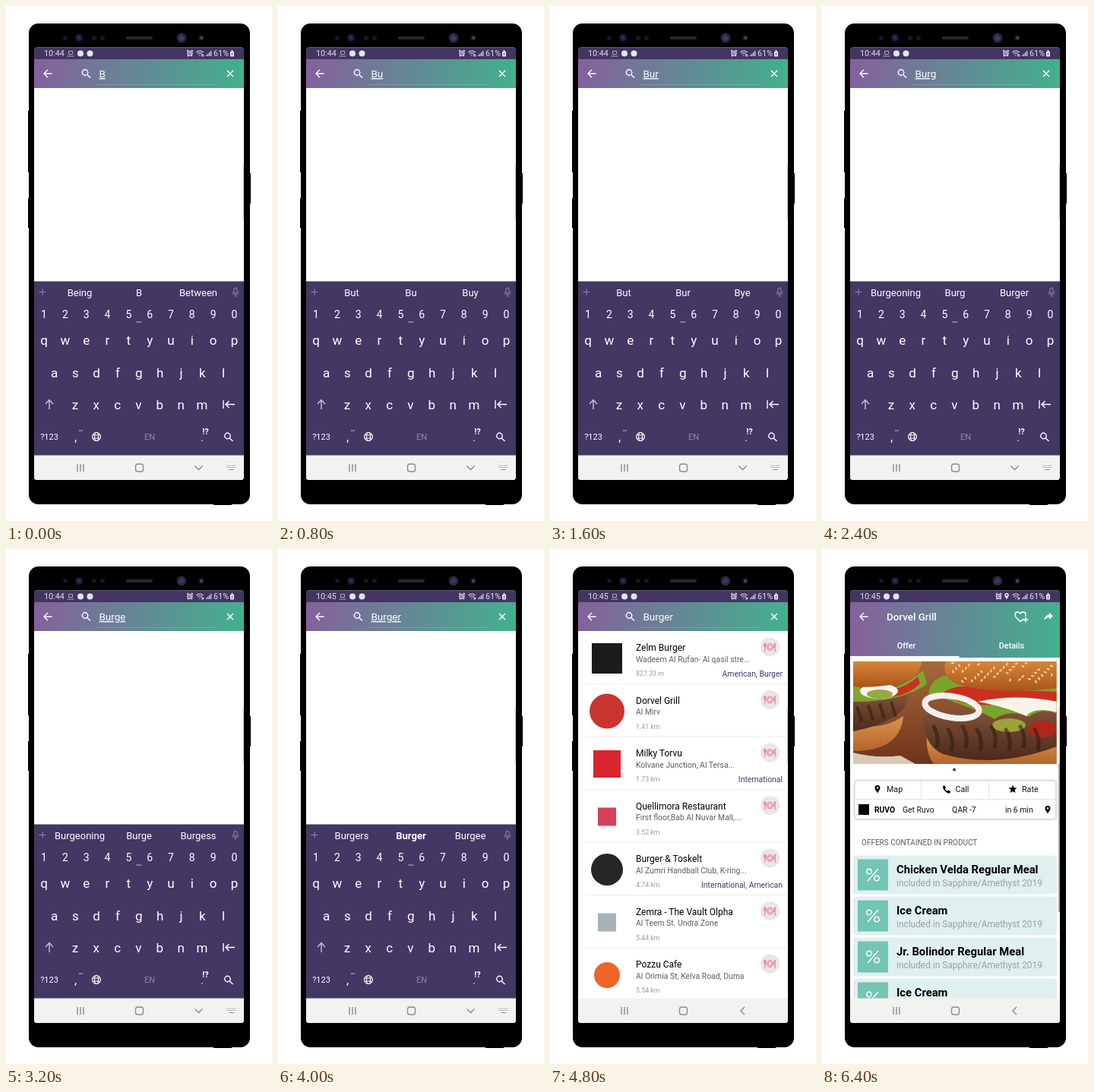
An HTML page for the animation above (8 s loop, 350 by 678 pixels).

```html
<!DOCTYPE html>
<html lang="en">
<head>
<meta charset="utf-8">
<title>Food search on a phone</title>
<style>
  html, body { margin: 0; width: 100%; height: 100%; overflow: hidden; background: #fff; }
  svg { display: block; width: 350px; height: 678px; font-family: Roboto, "Open Sans", Arial, sans-serif; }
  .line { fill: none; stroke: currentColor; stroke-width: 1.4; }
  .mid { text-anchor: middle; }
  .end { text-anchor: end; }
  .typed { text-decoration: underline; text-decoration-thickness: 1px; text-decoration-skip-ink: none; }
  /* --at: start of the visible span, in steps of 800 ms */
  .shown { animation: 8s step-end calc(var(--at) * .8s - 8s) infinite; }
  .key { animation-name: one; }
  .page { animation-name: two; }
  .half { animation-name: five; }
  .search { animation-name: six; }
  .browse { animation-name: eight; }
  @keyframes one { 0% { visibility: visible } 10%, 100% { visibility: hidden } }
  @keyframes two { 0% { visibility: visible } 20%, 100% { visibility: hidden } }
  @keyframes five { 0% { visibility: visible } 50%, 100% { visibility: hidden } }
  @keyframes six { 0% { visibility: visible } 60%, 100% { visibility: hidden } }
  @keyframes eight { 0% { visibility: visible } 80%, 100% { visibility: hidden } }
</style>
</head>
<body>
<svg viewBox="0 0 350 678">
  <defs>
    <linearGradient id="bar"><stop stop-color="#85609d"/><stop offset="1" stop-color="#42b18c"/></linearGradient>
    <linearGradient id="wood" x2="0" y2="1"><stop stop-color="#a8693c"/><stop offset="1" stop-color="#6e331c"/></linearGradient>
    <linearGradient id="bun" x2="0" y2="1"><stop stop-color="#d68539"/><stop offset="1" stop-color="#a9551b"/></linearGradient>
    <linearGradient id="crumb" x2="0" y2="1"><stop stop-color="#d9954f"/><stop offset="1" stop-color="#b5642a"/></linearGradient>
    <linearGradient id="patty" x2="0" y2="1"><stop stop-color="#835339"/><stop offset="1" stop-color="#4b2a1b"/></linearGradient>
    <clipPath id="screen"><rect x="37" y="54.500" width="276" height="569.500" rx="4"/></clipPath>
    <clipPath id="photo"><rect x="41" y="148" width="267.5" height="135"/></clipPath>
    <g id="back" class="line"><path d="M60.500 89H50.500M55 84l-5 5 5 5"/></g>
    <g id="lens" class="line"><circle r="3.700" cx="-1.500" cy="-1.500"/><path d="M1.200 1.200 5.500 5.500"/></g>
    <path id="pin" d="M0 5.500C-1.500 2.500-3.500 1-3.500-1.500a3.500 3.500 0 0 1 7 0C3.500 1 1.500 2.500 0 5.500zM0-3a1.300 1.300 0 1 0 .01 0z" fill-rule="evenodd"/>
    <g id="alarm" class="line"><circle r="2.900" cy=".5"/><path d="M0-1V.8H1.500M-4-2.500-2-4M4-2.500 2-4M-2 3-3 4.200M2 3 3 4.200"/></g>
    <g id="wifi" class="line"><path d="M-4.500-1.500Q0-5.500 4.500-1.500M-2.800.5Q0-2 2.800.5M-.8 2.500H.8M3 1V4M4.500 4V1" stroke-width="1.100"/></g>
    <path id="signal" d="M-4 3.500h1.200V2H-4zM-2 3.500h1.200V.5H-2zM0 3.500h1.200V-1.500H0zM2 3.500h1.200v-7H2z"/>
    <g id="plate">
      <circle r="12.500" fill="#e7e7e8"/>
      <g fill="none" stroke="#f0687c" stroke-width=".9">
        <circle r="4.400"/><circle r="2.700"/>
        <path d="M-7.800-5v3.500q0 1.500 1.100 1.500T-5.600-1.500V-5M-6.700-5V6M6.700 6V-5Q5-3 5.300.800H6.700"/>
      </g>
    </g>
    <g id="percent" fill="none" stroke="#fff" stroke-width="1.400">
      <path d="M7-8-7 8"/><circle cx="-5" cy="-4.500" r="3.200"/><circle cx="5" cy="4.500" r="3.200"/>
    </g>
  </defs>

  <!-- body -->
  <path d="M29 138h2v81h-2zM29 253h2v39h-2zM320 220h2v40h-2zM273 655h24v2h-24z"/>
  <rect x="30" y="23" width="291" height="633" rx="12.500"/>
  <rect x="158" y="40" width="35" height="4" rx="2" fill="#29282b"/>
  <g fill="#17161f">
    <circle cx="78" cy="42" r="3"/><circle cx="116" cy="42" r="3"/><circle cx="127" cy="42" r="3"/>
    <circle cx="96" cy="42" r="5" fill="#1b1a3c"/><circle cx="96" cy="42" r="2.300" fill="#2d2f66"/>
    <circle cx="231" cy="42" r="6.300" fill="#2a2b3c"/><circle cx="231" cy="42" r="3.200" fill="#343f72"/>
    <circle cx="257" cy="42" r="3.500" fill="#1d2030"/><circle cx="257" cy="42" r="1.500" fill="#525d7c"/>
  </g>

  <g clip-path="url(#screen)">
    <rect x="37" y="54" width="277" height="570" fill="#fff"/>
    <rect x="37" y="54" width="277" height="16" fill="#433563"/>
    <rect x="37" y="70" width="277" height="38" fill="url(#bar)"/>

    <!-- search field -->
    <g class="shown browse" style="--at:0" color="#fff">
      <use href="#back"/><use href="#lens" x="105.500" y="89"/>
      <path class="line" d="M291 85l8 8M299 85l-8 8"/>
      <path d="M118 103.500H277" stroke="#fff" stroke-opacity=".16"/>
    </g>

    <g id="keyboard" class="shown search" style="--at:0">
      <rect x="37" y="362.500" width="277" height="230" fill="#433764"/>
      <g color="#928aa9" fill="none" stroke="currentColor">
        <path d="M43.500 376.500h9M48 372v9"/>
        <rect x="300" y="371" width="4" height="7" rx="2"/><path d="M298 376q0 4 4 4t4-4M302 380v3"/>
      </g>
      <g color="#fff" class="line">
        <path d="M57 531v-12M52 524l5-5.500 5 5.500" stroke="#c9c4d5"/>
        <path d="M286 519v11M301 524.500H289M293.500 520l-4.500 4.500 4.500 4.500"/>
        <path d="M171.500 416h7M96 559h5" stroke-width="1.100" stroke-dasharray="1.300 .7"/>
        <g stroke-width="1.100"><circle cx="119" cy="567" r="5.500"/><ellipse cx="119" cy="567" rx="2.500" ry="5.500"/><path d="M114 565h10M114 569h10"/></g>
        <use href="#lens" x="293" y="567.500"/>
      </g>
    </g>

    <g id="list" class="shown page" style="--at:6"></g>

    <g id="offer" class="shown page" style="--at:8">
      <rect x="37" y="70" width="277" height="73" fill="url(#bar)"/>
      <rect x="37" y="141" width="143.500" height="2.500" fill="#fff"/>
      <g color="#fff" fill="#fff">
        <use href="#back"/>
        <path class="line" d="M265 92l-4 3.500q-7-5.500-7-9 0-3.500 3.500-3.500 2 0 3.500 2 1.500-2 3.500-2 3.500 0 3.500 3.500l-.500 2M268 89.500v7M264.500 93h7"/>
        <path d="M292 94q1-7 7-7.500V83.500l5 4.800-5 4.800V90q-4 0-7 4z"/>
      </g>
      <g id="meal" clip-path="url(#photo)">
        <rect x="41" y="148" width="268" height="135" fill="url(#wood)"/>
        <path d="M41 268q30 8 62 4l20 11H41z" fill="#d8c9b8"/>
        <path d="M41 228q34 14 66-8-4 46-66 46z" fill="url(#crumb)"/>
        <path d="M41 198q42-12 72-8 2 35-72 50z" fill="url(#patty)"/>
        <path d="M41 178q40 24 92-18l5 18q-35 24-97 23z" fill="#7fa52f"/>
        <path d="M72 184q30 6 54-16l3 9q-22 22-57 17z" fill="#c9301f"/>
        <ellipse cx="75" cy="187" rx="25" ry="10" fill="#f7f2ee"/>
        <ellipse cx="76" cy="191" rx="17" ry="6" fill="#98a73e"/>
        <path d="M41 148h90q-2 26-42 31-28 4-48 2z" fill="url(#bun)"/>
        <path d="M138 246q75 50 171 5v32H147q-11-15-9-37z" fill="url(#crumb)"/>
        <path d="M133 216q70-12 176-4v48q-80 30-150 10-27-12-26-54z" fill="url(#patty)"/>
        <path d="M140 190q4-24 32-24l137 10v41q-20-9-37 4-25-11-45 3-22-13-87-34z" fill="#79a52d"/>
        <path d="M158 190q20-15 54-6l97 4v12q-40 8-76 3-40 9-75-13z" fill="#cd2f1e"/>
        <path d="M205 201q50-11 104 0v14q-30-8-40 5-30-13-64-19z" fill="#f8f3e9"/>
        <ellipse cx="171" cy="208" rx="36" ry="14" fill="none" stroke="#f6f1ef" stroke-width="8" transform="rotate(9 171 208)"/>
        <ellipse cx="246" cy="232" rx="22" ry="9" fill="#9ca33a"/>
        <ellipse cx="290" cy="237" rx="18" ry="11" fill="#b1251b"/>
        <path d="M163 148h146v35q-75 10-128-4-25-8-18-31z" fill="url(#bun)"/>
      </g>
      <circle cx="174" cy="290.500" r="2" fill="#3e3575"/>
      <rect x="42.500" y="304.500" width="265.500" height="51.500" rx="4" fill="#fff" stroke="#dcdce1" stroke-width="2"/>
      <path d="M43 329.500h265M130.500 305v24M219.500 305v24" stroke="#e2e2e6"/>
      <use href="#pin" x="73" y="316"/><use href="#pin" x="297" y="343"/>
      <path d="M159 312l2.500-.500 1.500 3-1.300 1.300q1.200 2.200 3 3l1.300-1.300 3 1.500-.800 2.500q-2 1-5.500-2-3.800-3.500-3.700-7.500z"/>
      <path d="M251 310.500l1.500 3.700 4 .300-3 2.600.900 3.900-3.400-2.100-3.400 2.100.900-3.900-3-2.600 4-.300z"/>
      <rect x="48" y="336" width="14" height="14"/>
      <rect x="311" y="282" width="2.500" height="196" fill="#a9a9ad"/>
    </g>

    <!-- status bar -->
    <g id="status" fill="#e4e0ec" color="#e4e0ec">
      <g class="shown browse" style="--at:0">
        <path d="M82.500 59.500h5v4h-5zM80.500 66h9" fill="none" stroke="#bdb6cc" stroke-width=".9"/>
        <circle cx="98" cy="62.500" r="4"/><circle cx="110.500" cy="62.500" r="4"/>
        <use href="#alarm" x="242" y="62"/>
      </g>
      <g class="shown page" style="--at:8">
        <circle cx="85" cy="62.500" r="4"/><circle cx="97.500" cy="62.500" r="4"/>
        <use href="#alarm" x="232.500" y="62"/><use href="#pin" transform="translate(243 62)scale(.8)"/>
      </g>
      <use href="#wifi" x="255" y="62.500"/><use href="#signal" x="267" y="62.500"/>
      <path d="M295 60h1.500v-2h2v2h1.500v6.500h-5z"/><path d="M297.500 62v2.500" stroke="#433563"/>
    </g>

    <!-- navigation -->
    <rect x="37" y="591.500" width="277" height="33" fill="#f2f2f0"/>
    <g class="line" color="#8b8b8d">
      <path d="M94 603v10M98 603v10M102 603v10"/>
      <rect x="170.500" y="603" width="10" height="10" rx="3"/>
      <g class="shown search" style="--at:0">
        <path d="M248.500 605.500l5 5 5-5"/>
        <path d="M290.500 605h12M290.500 607.500h12" stroke-width="1.100" stroke-dasharray="1.200 1"/><path d="M293 610.500h7" stroke-width=".9"/>
      </g>
      <path class="shown page" style="--at:6" d="M256 603l-5 5 5 5"/>
      <path class="shown page" style="--at:8" d="M256 603l-5 5 5 5"/>
    </g>
    <rect x="311.500" y="208" width="3" height="74" rx="1.500" fill="#d5d5d8"/>
  </g>
</svg>
<script>
const add = (id, markup) => document.getElementById(id).insertAdjacentHTML('beforeend', markup);
const text = (x, y, size, fill, str, extra = '') =>
  `<text x="${x}" y="${y}" font-size="${size}" fill="${fill}" ${extra}>${str}</text>`;
const mid = 'class="mid" ', end = 'class="end" ';
const bold = 'font-weight="700"', medium = 'font-weight="500"';
const shown = (kind, at, body) => `<g class="shown ${kind}" style="--at:${at}">${body}</g>`;

// Status text
add('status', shown('half', 0, text(50, 66, 10.8, '#e4e0ec', '10:44'))
  + shown('half', 5, text(50, 66, 10.8, '#e4e0ec', '10:45'))
  + text(273, 66, 10.8, '#e4e0ec', '61%'));

// Keyboard
const step = 27.83;
const keyRow = (keys, x, y, size) => [...keys].map((k, i) =>
  text(x + i * step, y, size, '#fff', k, mid)).join('');
add('keyboard', keyRow('1234567890', 50, 411, 14) + keyRow('qwertyuiop', 50, 446, 17)
  + keyRow('asdfghjkl', 63.5, 489, 17) + keyRow('zxcvbnm', 91, 531, 17)
  + text(57, 571, 11, '#fff', '?123', mid) + text(91.5, 573, 16, '#fff', ',', mid)
  + text(189, 571, 11, '#9189ab', 'EN', mid)
  + text(262.5, 564, 11, '#fff', '!?', mid + bold) + text(258, 573, 14, '#fff', '.', mid));

// Typing, one letter per step
const word = 'Burger';
const guesses = [['Being', 'Between'], ['But', 'Buy'], ['But', 'Bye'],
  ['Burgeoning', 'Burger'], ['Burgeoning', 'Burgess'], ['Burgers', 'Burgee']];
add('keyboard', guesses.map(([left, right], i) => {
  const typed = word.slice(0, i + 1);
  return shown('key', i, text(122.5, 94, 13.4, '#fff', typed, 'class="typed"')
    + text(97, 381.5, 13, '#fff', left, mid) + text(253, 381.5, 13, '#fff', right, mid)
    + text(175, 381.5, 13, '#fff', typed, mid + (typed === word ? bold : '')));
}).join(''));

// Result list: name, place, distance, kind, mark colour, mark size, round mark
const places = [
  ['Zelm Burger', 'Wadeem Al Rufan- Al qasil stre...', '827.33 m', 'American, Burger', '#1d1a1a', 40],
  ['Dorvel Grill', 'Al Mirv', '1.41 km', '', '#c9352c', 46, 1],
  ['Milky Torvu', 'Kolvane Junction, Al Tersa...', '1.73 km', 'International', '#d8252e', 36],
  ['Quellimora Restaurant', 'First floor,Bab Al Nuvar Mall,...', '3.52 km', '', '#d9405a', 24],
  ['Burger &amp; Toskelt', 'Al Zumri Handball Club, K-ring...', '4.74 km', 'International, American', '#262626', 42, 1],
  ['Zemra - The Vault Olpha', 'Al Teem St. Undra Zone', '5.44 km', '', '#a7b3ba', 24],
  ['Pozzu Cafe', 'Al Orimia St, Kelva Road, Duma', '5.54 km', '', '#ee6429', 34, 1],
];
add('list', text(122.5, 94, 13.4, '#fff', word) + places.map(([name, place, far, kind, color, size, round], i) => {
  const y = 108 + i * 69.5;
  return `<rect x="${75 - size / 2}" y="${y + 36 - size / 2}" width="${size}" height="${size}" rx="${round ? size / 2 : 0}" fill="${color}"/>`
    + `<path d="M47 ${y + 69.5}H313" stroke="#ececec"/><use href="#plate" x="289.5" y="${y + 21}"/>`
    + text(113, y + 26, 12, '#000', name) + text(113, y + 40.5, 10.4, '#5d5d60', place)
    + text(113, y + 59, 8.8, '#9a9a9d', far) + text(306, y + 60, 10.4, '#41366f', kind, end);
}).join(''));

// Meal details: seeds and grill marks
let detail = '';
for (let i = 0; i < 44; i++) {
  const x = 172 + (i * 37.7) % 134, y = 150 + (i * 11.3) % 25;
  detail += `<ellipse cx="${x}" cy="${y}" rx="2.200" ry="1.200" fill="#efcf97" transform="rotate(${i * 53 % 180} ${x} ${y})"/>`;
}
for (let i = 0; i < 8; i++)
  detail += `<path d="M${146 + i * 19} ${232 + i % 2 * 4}q9 14 5 30" fill="none" stroke="#2d1a13" stroke-width="5" stroke-opacity=".55"/>`;
for (let i = 0; i < 4; i++)
  detail += `<path d="M${46 + i * 15} ${207 - i * 2}l6 20" stroke="#2d1a13" stroke-width="4" stroke-opacity=".55"/>`;
add('meal', detail);

// Offer page
add('offer', text(85, 94, 13.4, '#fff', 'Dorvel Grill', medium)
  + text(111, 131, 10.8, '#fff', 'Offer', mid + medium) + text(249.5, 131, 10.8, '#fff', 'Details', mid + medium)
  + [[85, 'Map'], [175.5, 'Call'], [263, 'Rate']].map(([x, s]) => text(x, 320, 10.7, '#111', s)).join('')
  + text(69, 347, 10.3, '#000', 'RUVO', bold)
  + [[106, 'Get Ruvo'], [171, 'QAR -7'], [241, 'in 6 min']].map(([x, s]) => text(x, 347, 10.4, '#111', s)).join('')
  + text(52, 389.5, 10, '#5c5c60', 'OFFERS CONTAINED IN PRODUCT'));
const meals = ['Chicken Velda Regular Meal', 'Ice Cream', 'Jr. Bolindor Regular Meal', 'Ice Cream'];
add('offer', meals.map((meal, i) => {
  const y = 403.5 + i * 54;
  return `<rect x="41" y="${y}" width="268" height="51" rx="4" fill="#dff0ef"/>`
    + `<rect x="47" y="${y + 5}" width="40" height="41" fill="#74c4b4"/><use href="#percent" x="67" y="${y + 25.5}"/>`
    + text(98, y + 23.5, 14.8, '#000', meal, bold)
    + text(98, y + 40, 11.9, '#9aa0a2', 'included in Sapphire/Amethyst 2019');
}).join(''));
</script>
</body>
</html>
```
